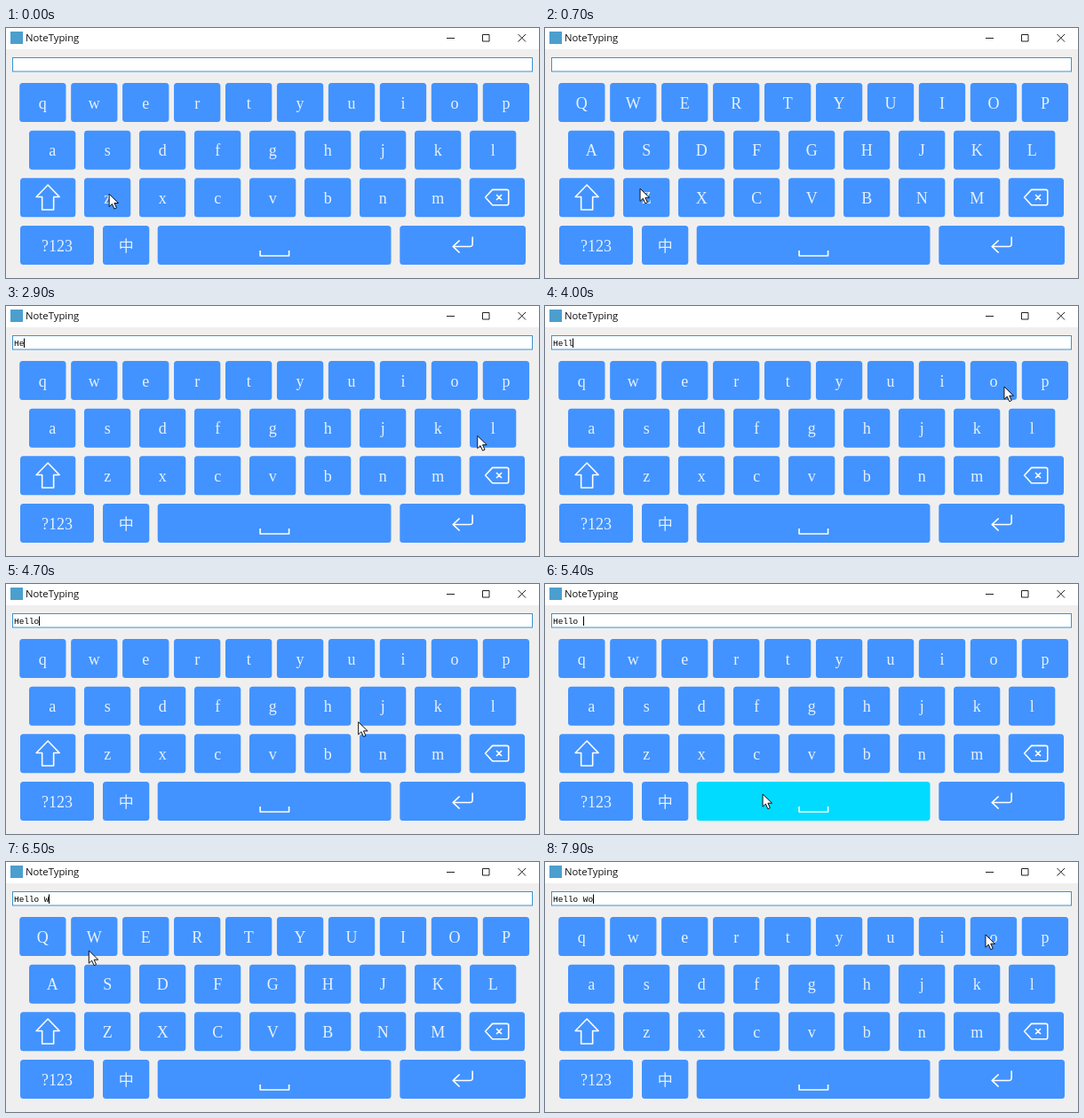
An HTML page that plays this animation: 600 px wide and 282 px high, repeating every 8000 ms.

```html
<!DOCTYPE html>
<html lang="en">
<head>
<meta charset="utf-8">
<title>On-screen keyboard</title>
<style>
  html, body { margin: 0; width: 100%; height: 100%; overflow: hidden; background: #f0eff0; }
  svg { display: block; width: 100vw; height: 100vh; }
  .title { font: 11.3px "Open Sans", sans-serif; fill: #111; }
  .entry { font: 9.4px "Liberation Mono", monospace; fill: #000; white-space: pre; }
  .label { font: 18px "Liberation Serif", serif; fill: #e6f1ff; text-anchor: middle; }
  .cjk { font: 17px "Noto Sans CJK SC", "Noto Sans CJK", sans-serif; font-weight: 300; }
  .icon { fill: none; stroke: #fff; stroke-width: 1.6; stroke-linejoin: round; }
  .chrome { fill: none; stroke: #222; stroke-width: 1; }
</style>
</head>
<body>
<svg viewBox="0 0 600 282">
  <rect width="600" height="282" fill="#f0eff0"/>
  <rect width="600" height="24" fill="#fff"/>
  <rect x="5" y="4" width="14" height="14" fill="#4b9fce"/>
  <text class="title" x="22" y="15">NoteTyping</text>
  <path class="chrome" d="M496 11.5h9M536.5 7.5h7.5v7.5h-7.5zM576.5 7l8.5 8.5M585 7l-8.5 8.5"/>
  <rect x="7.5" y="33.5" width="585" height="15.5" fill="#fff" stroke="#3c93cf"/>
  <text class="entry" id="entry" x="9" y="45" xml:space="preserve"></text>
  <path id="caret" d="M0 36.5v10.5" stroke="#000"/>
  <g id="keys"></g>
  <g id="pointer">
    <circle id="busy" cx="11.5" cy="0.5" r="4.8" fill="#d9f3ff" stroke="#27a3e2" stroke-width="2.8"/>
    <path d="M0 0v14.2l3.3-3.1 2.5 5.6 2.5-1.1-2.5-5.4h4.7z" fill="#fff" stroke="#111"/>
  </g>
</svg>
<script>
const LOOP = 8000, STEP = 100, HOLD = 150, LINGER = 180, SETTLE = 40;
const BLUE = '#4293ff', CYAN = '#00dbff';
const KEY_WIDTH = 52.3, WIDE_WIDTH = 62.3, KEY_HEIGHT = 44;
const $ = id => document.getElementById(id);
const rowY = row => 62 + row * 53.67;
const keys = {};

function add(tag, attrs, text = '') {
  const node = document.createElementNS('http://www.w3.org/2000/svg', tag);
  for (const name in attrs) node.setAttribute(name, attrs[name]);
  node.textContent = text;
  $('keys').append(node);
  return node;
}

function addKey(name, x, row, width, { label = name, icon, cjk } = {}) {
  const y = rowY(row), cx = x + width / 2, cy = y + KEY_HEIGHT / 2;
  const rect = add('rect', { x, y, width, height: KEY_HEIGHT, rx: 3.5, fill: BLUE });
  const key = keys[name] = { rect, cx, cy };
  if (icon) add('path', { class: 'icon', d: icon, transform: `translate(${cx} ${cy})` });
  else key.text = add('text', { class: cjk ? 'label cjk' : 'label', x: cx, y: cy + 6.5 }, label);
}

function addLetters(letters, x, row, pitch) {
  [...letters].forEach((letter, i) => addKey(letter, x + i * pitch, row, KEY_WIDTH));
}

addLetters('qwertyuiop', 15.2, 0, 57.95);
addLetters('asdfghjkl', 26, 1, 62);
addLetters('zxcvbnm', 88, 2, 62);
addKey('shift', 16, 2, WIDE_WIDTH, { icon: 'M0-14.3l-13 13.5h6.5v14.5h13v-14.5h6.5z' });
addKey('back', 521.7, 2, WIDE_WIDTH, {
  icon: 'M-13.3-.3l8-8.7h16.2q2 0 2 2v13.4q0 2-2 2h-16.2zM-.8-3.3l6 6m0-6l-6 6'
});
addKey('digits', 16, 3, 83, { label: '?123' });
addKey('lang', 109, 3, KEY_WIDTH, { label: '中', cjk: true });
addKey(' ', 170.7, 3, 262.8, { icon: 'M-16 6v6h32.5v-6' });
addKey('enter', 443.3, 3, 141.7, { icon: 'M11-9.5v8q0 3-3 3h-19m7.5-7l-7.5 7 7.5 7' });

// The pointer visits keys, aiming at their centres plus an offset.
const hover = (at, name, dx = 0, dy = 0) =>
  ({ at, name, x: keys[name].cx + dx, y: keys[name].cy + dy });
const press = (...args) => ({ ...hover(...args), pressed: true });

const visits = [
  hover(0, 'z', 2, -4),
  press(400, 'shift'), press(1050, 'h'),
  hover(1500, 'e', 25, 25),
  press(2000, 'shift'), press(2450, 'e'),
  press(2950, 'l', -16, 9), press(3350, 'l', -16, 9),
  press(4040, 'o', 12, 7), press(5300, ' ', -57, -8),
  press(5950, 'shift'), press(6340, 'w', -6, 16),
  press(6980, 'shift'), press(7700, 'o', -9, -2)
];

function pointerAt(t) {
  const next = visits.findIndex(v => v.at - SETTLE > t);
  if (next < 0) return visits[visits.length - 1];
  const a = visits[next - 1], b = visits[next];
  const leave = a.at + LINGER, arrive = b.at - SETTLE;
  const u = Math.max(0, (t - leave) / (arrive - leave));
  const ease = u * u * (3 - 2 * u);
  return { x: a.x + (b.x - a.x) * ease, y: a.y + (b.y - a.y) * ease };
}

const setVisible = (id, on) => $(id).setAttribute('visibility', on ? 'visible' : 'hidden');
const moveTo = (id, x, y) => $(id).setAttribute('transform', `translate(${x} ${y})`);

function render(t) {
  let upper = false, typed = '', held = '';
  const cased = name => upper ? name.toUpperCase() : name;
  for (const { at, name, pressed } of visits) {
    if (!pressed || t < at) continue;
    if (name === 'shift') upper = !upper;
    else typed += cased(name);
    if (t < at + HOLD) held = name;
  }
  for (const name in keys) {
    const { rect, text } = keys[name];
    rect.setAttribute('fill', name === held ? CYAN : BLUE);
    if (text && name.length === 1) text.textContent = cased(name);
  }
  $('entry').textContent = typed;
  setVisible('caret', typed);
  moveTo('caret', Math.round(8.7 + typed.length * 5.64) + 0.5, 0);
  setVisible('busy', t >= 1200 && t < 1800);
  const { x, y } = pointerAt(t);
  moveTo('pointer', x, y);
}

const start = performance.now();
function tick() {
  const t = (performance.now() - start) % LOOP;
  render(Math.floor(t / STEP) * STEP);
  requestAnimationFrame(tick);
}
tick();
</script>
</body>
</html>
```
